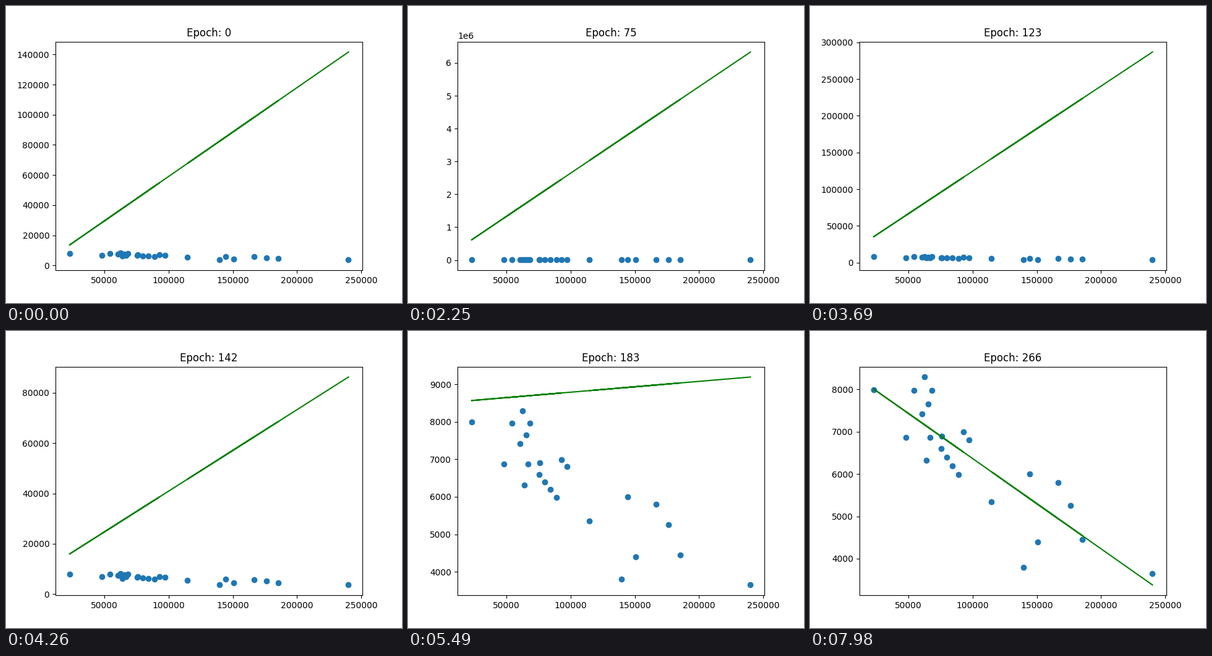
A matplotlib script that plays this animation: 640 px wide and 480 px high, repeating every 8 s.

```python
import numpy as np
import matplotlib.pyplot as plt
from matplotlib.animation import FuncAnimation

EPOCHS = 267
LOOP_MS = 8000

FIRST_SLOPE = 0.590
FINAL_SLOPE, INTERCEPT = -0.02145, 8500
START_ERROR, DECAY = 3376, 0.0647

# Lone points: thousands of km, price
KEY_POINTS = [(240, 3650), (139.8, 3800), (150.5, 4400), (185.5, 4450),
              (176, 5250), (114.8, 5350), (166.8, 5800), (144.5, 6000),
              (97.5, 6800), (76, 6900), (93, 6990), (22.9, 7990)]


def cluster():
    """Eight points that jump between a low and a high waving band."""
    k = np.arange(8)
    wave = np.sin(2 * np.pi * (k // 2) / 3)
    x = np.interp(k, [0, 2, 7], [48.2, 60.9, 68.5])
    y = np.where(k % 2, 7970 + 370 * wave, 6870 + 640 * wave)
    return np.column_stack([x, y])


def falling_run():
    """Four points that step evenly downwards."""
    return np.linspace((75.5, 6600), (89, 5990), 4)


points = np.vstack([KEY_POINTS, falling_run(), cluster()])
km, price = points[:, 0] * 1000, points[:, 1]


def predict(epoch):
    """Fitted line: after the first step the slope error decays."""
    if epoch == 0:
        return FIRST_SLOPE * km
    slope = FINAL_SLOPE + START_ERROR * np.exp(-DECAY * epoch)
    return INTERCEPT + slope * km


def limits(*series):
    values = np.concatenate(series)
    lo, hi = values.min(), values.max()
    pad = 0.05 * (hi - lo)
    return lo - pad, hi + pad


fig, ax = plt.subplots(figsize=(6.4, 4.8), dpi=100)
ax.scatter(km, price)
line, = ax.plot(km, predict(0), color="green")
title = ax.set_title("Epoch: 0")
ax.set_xlim(limits(km))


def update(epoch):
    fit = predict(epoch)
    line.set_ydata(fit)
    ax.set_ylim(limits(price, fit))
    title.set_text(f"Epoch: {epoch}")
    return line, title


def init():
    return update(0)


anim = FuncAnimation(fig, update, frames=EPOCHS, init_func=init,
                     interval=LOOP_MS / EPOCHS, repeat=True, repeat_delay=0)
plt.show()
```
